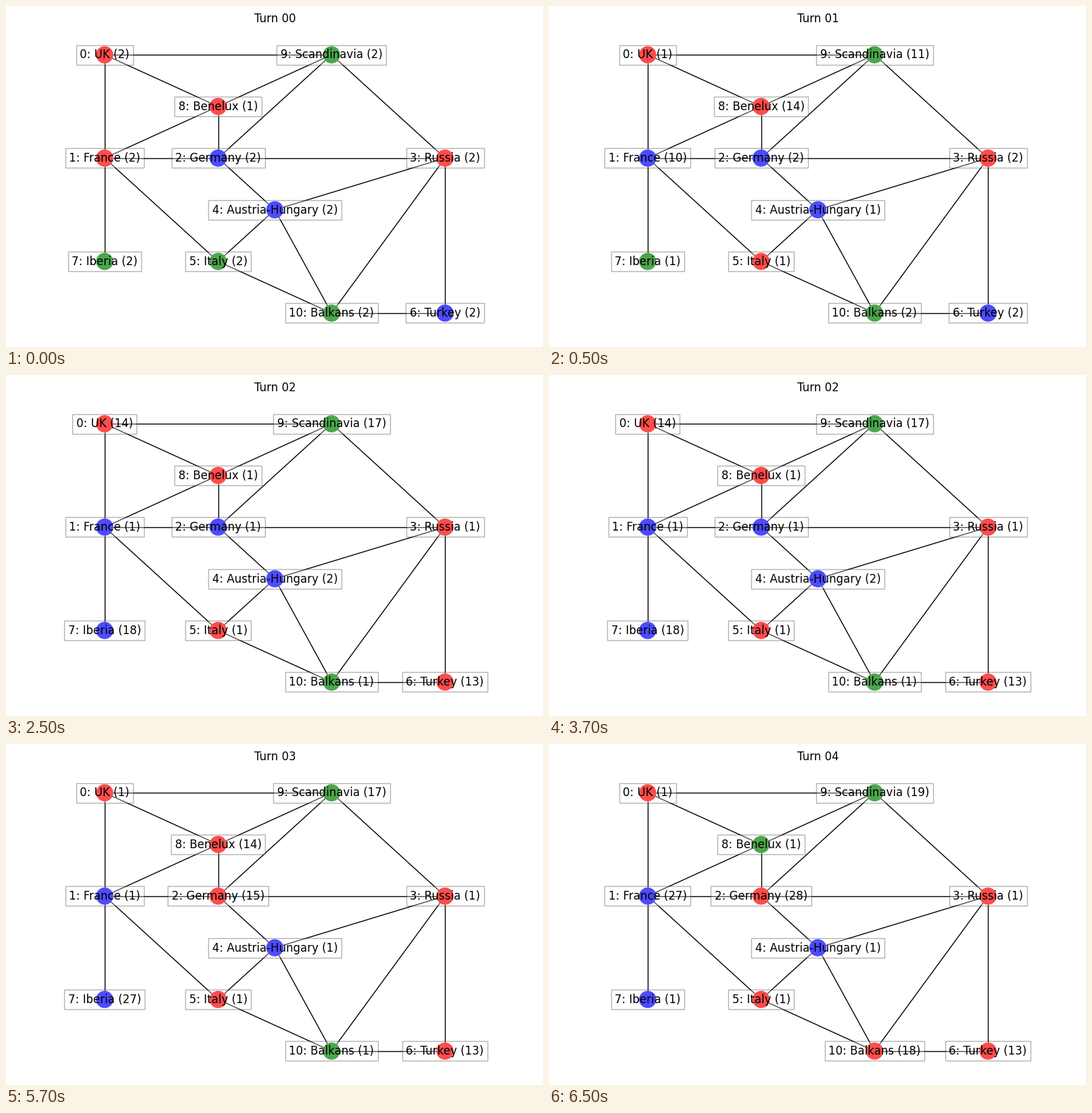
These frames come from a looping animation (794 px wide and 504 px high, 8 s). A matplotlib script:

```python
import matplotlib.pyplot as plt
from matplotlib.animation import FuncAnimation
from matplotlib.collections import LineCollection
from matplotlib.transforms import ScaledTranslation

WIDTH, HEIGHT, DPI = 794, 504, 100
PAD, AXES_W, AXES_H = 10, 775, 462
FRAME_MS, LOOP_MS = 500, 8000
FRAMES_PER_TURN = 4
RED, GREEN, BLUE = "red", "green", "blue"

# name: (column, row), first owner, neighbours not already listed
MAP = {
    "UK": ((0, 5), RED, ["France", "Benelux", "Scandinavia"]),
    "France": ((0, 3), RED, ["Germany", "Italy", "Iberia", "Benelux"]),
    "Germany": ((2, 3), BLUE, ["Russia", "Austria-Hungary", "Benelux", "Scandinavia"]),
    "Russia": ((6, 3), RED, ["Austria-Hungary", "Turkey", "Scandinavia", "Balkans"]),
    "Austria-Hungary": ((3, 2), BLUE, ["Italy", "Balkans"]),
    "Italy": ((2, 1), GREEN, ["Balkans"]),
    "Turkey": ((6, 0), BLUE, ["Balkans"]),
    "Iberia": ((0, 1), GREEN, []),
    "Benelux": ((2, 4), RED, ["Scandinavia"]),
    "Scandinavia": ((4, 5), GREEN, []),
    "Balkans": ((4, 0), GREEN, []),
}

# Each turn: the usual garrison, armies that differ from it, and conquests.
TURNS = [
    (2, {"Benelux": 1}, {}),
    (1, {"France": 10, "Germany": 2, "Russia": 2, "Turkey": 2, "Benelux": 14,
         "Scandinavia": 11, "Balkans": 2}, {"France": BLUE, "Italy": RED}),
    (1, {"UK": 14, "Austria-Hungary": 2, "Turkey": 13, "Iberia": 18,
         "Scandinavia": 17}, {"Iberia": BLUE, "Turkey": RED}),
    (1, {"Germany": 15, "Turkey": 13, "Iberia": 27, "Benelux": 14,
         "Scandinavia": 17}, {"Germany": RED}),
    (1, {"France": 27, "Germany": 28, "Turkey": 13, "Scandinavia": 19,
         "Balkans": 18}, {"Benelux": GREEN, "Balkans": RED}),
]


def padded(low, high, margin):
    extra = (high - low) * margin
    return low - extra, high + extra


def add_texts(transform, **style):
    return [ax.text(*place, "", size=12, ha="center", va="center",
                    transform=transform, zorder=3, **style)
            for place in places.values()]


plt.rcParams["font.family"] = "DejaVu Sans"
fig = plt.figure(figsize=(WIDTH / DPI, HEIGHT / DPI), dpi=DPI, facecolor="white")
ax = fig.add_axes([PAD / WIDTH, PAD / HEIGHT, AXES_W / WIDTH, AXES_H / HEIGHT])
ax.set_axis_off()

places = {name: place for name, (place, _, _) in MAP.items()}
borders = [(places[name], places[other])
           for name, (_, _, neighbours) in MAP.items() for other in neighbours]
ax.add_collection(LineCollection(borders, colors="black", linewidths=1, zorder=1))
nodes = ax.scatter(*zip(*places.values()), s=300, zorder=2)

# Lettering sits a third of a pixel below the centre of its box.
nudge = ScaledTranslation(0, -1 / 3 / DPI, fig.dpi_scale_trans)
boxes = add_texts(ax.transData, color="none", bbox=dict(facecolor="white", alpha=0.3))
labels = add_texts(ax.transData + nudge)
title = ax.set_title("", size=12)
ax.set_xlim(padded(0, 6, 0.27))
ax.set_ylim(padded(0, 5, 0.105))


def draw(frame):
    # The opening turn lasts one frame, later ones up to four.
    turn = (frame + FRAMES_PER_TURN - 1) // FRAMES_PER_TURN
    owners = {name: owner for name, (_, owner, _) in MAP.items()}
    for _, _, conquests in TURNS[:turn + 1]:
        owners.update(conquests)
    garrison, armies, _ = TURNS[turn]

    title.set_text(f"Turn {turn:02d}")
    nodes.set_color(list(owners.values()))
    for i, (name, box, label) in enumerate(zip(MAP, boxes, labels)):
        caption = f"{i}: {name} ({armies.get(name, garrison)})"
        box.set_text(caption)
        label.set_text(caption)
    return [title, nodes, *boxes, *labels]


anim = FuncAnimation(fig, draw, frames=LOOP_MS // FRAME_MS, interval=FRAME_MS,
                     init_func=lambda: draw(0), repeat=True, repeat_delay=0)
plt.show()
```
